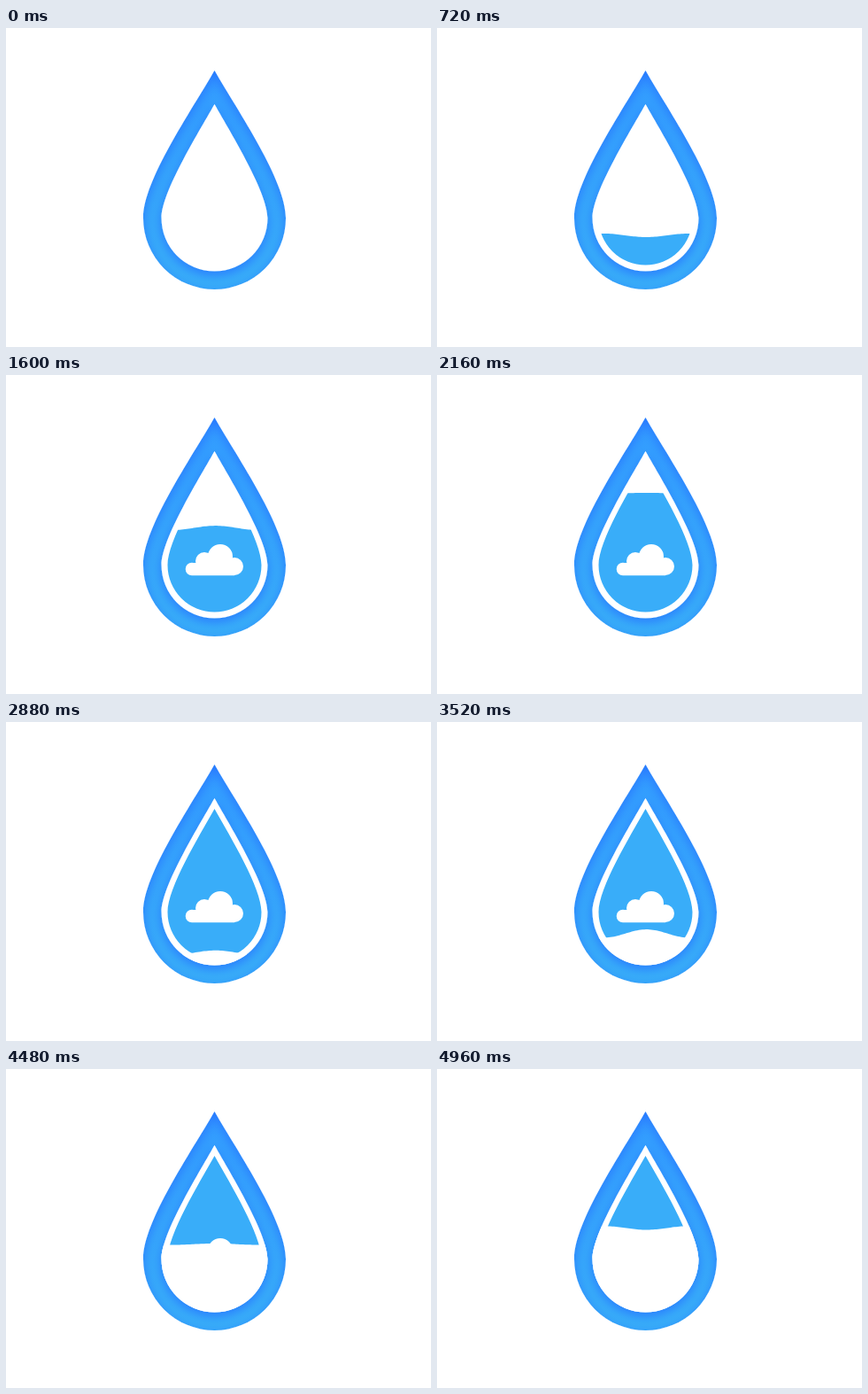
An HTML page with a canvas for the animation above (5040 ms loop, 480 px wide and 360 px high).

```html
<!DOCTYPE html>
<html lang="en">
<head>
<meta charset="utf-8">
<title>Filling drop</title>
<style>
  html, body { margin: 0; width: 100%; height: 100%; overflow: hidden; background: #fff; }
  canvas { display: block; }
</style>
</head>
<body>
<canvas width="480" height="360"></canvas>
<script>
const ctx = document.querySelector('canvas').getContext('2d');
const LOOP = 5040, STEP = 80, DRAIN_START = 2880;
const CX = 235.5, CY = 214.5;

// [time, surface height, bulge at the centre]
const fillKeys = [[160, 274, 2], [720, 234, 2], [1600, 172.5, -2.4], [2720, 94, 2]];
const drainKeys = [[2880, 260.3, -2.5], [3520, 238.7, -4.6], [3920, 219, -4.2], [4960, 179.4, 2.1]];

// Drop with a pointed tip, two bent sides and a round bottom
function drop(tip, radius, bendX, bendY, sideY) {
  const path = new Path2D();
  path.moveTo(CX, tip);
  path.bezierCurveTo(CX + bendX, bendY, CX + radius, sideY, CX + radius, CY);
  path.arc(CX, CY, radius, 0, Math.PI);
  path.bezierCurveTo(CX - radius, sideY, CX - bendX, bendY, CX, tip);
  path.closePath();
  return path;
}

const outer = drop(48, 80.5, 27, 95, 172);
const inner = drop(86, 60, 20, 121, 186);
const tank = drop(98, 53, 18, 130, 187);

const ring = new Path2D(outer);
ring.addPath(inner);
const outside = new Path2D();
outside.rect(-100, -100, 680, 560);
outside.addPath(ring);

const cloud = new Path2D();
for (const [x, y, r] of [[210, 219, 7.3], [224, 210, 10], [242, 205, 14], [258, 216, 10]]) {
  cloud.moveTo(x + r, y);
  cloud.arc(x, y, r, 0, 2 * Math.PI);
}
cloud.rect(210, 212, 48, 14.2);

const ringFill = ctx.createLinearGradient(0, 48, 0, 295);
ringFill.addColorStop(0, '#329cff');
ringFill.addColorStop(1, '#38b0f8');

function drawRing() {
  ctx.save();
  ctx.clip(ring, 'evenodd');
  ctx.fillStyle = ringFill;
  ctx.fillRect(0, 0, 480, 360);
  ctx.shadowColor = '#2878ff';
  ctx.shadowBlur = 13;
  ctx.shadowOffsetY = 4;
  ctx.fillStyle = '#fff';
  ctx.fill(outside, 'evenodd');
  ctx.restore();
}

function sample(keys, t) {
  let i = 1;
  while (i < keys.length - 1 && t > keys[i][0]) i++;
  const a = keys[i - 1], b = keys[i];
  const k = Math.max(0, Math.min(1, (t - a[0]) / (b[0] - a[0])));
  return [a[1] + (b[1] - a[1]) * k, a[2] + (b[2] - a[2]) * k];
}

function drawLiquid(keys, t, color) {
  const [level, bulge] = sample(keys, t);
  ctx.beginPath();
  ctx.moveTo(170, 300);
  for (let x = 170; x <= 302; x += 2) {
    ctx.lineTo(x, level + bulge * Math.cos(2 * Math.PI * (x - 236.5) / 95));
  }
  ctx.lineTo(302, 300);
  ctx.fillStyle = color;
  ctx.fill();
}

function draw(now) {
  const t = Math.floor(now % LOOP / STEP) * STEP;
  ctx.fillStyle = '#fff';
  ctx.fillRect(0, 0, 480, 360);
  drawRing();
  if (t >= 240) {
    ctx.save();
    ctx.clip(tank);
    drawLiquid(fillKeys, t, '#39adf9');
    ctx.restore();
    ctx.save();
    ctx.clip(inner);
    if (t >= DRAIN_START) drawLiquid(drainKeys, t, '#fff');
    ctx.fillStyle = '#fff';
    ctx.fill(cloud);
    ctx.restore();
  }
}

const start = performance.now();
function tick() {
  draw(performance.now() - start);
  requestAnimationFrame(tick);
}
tick();
</script>
</body>
</html>
```
